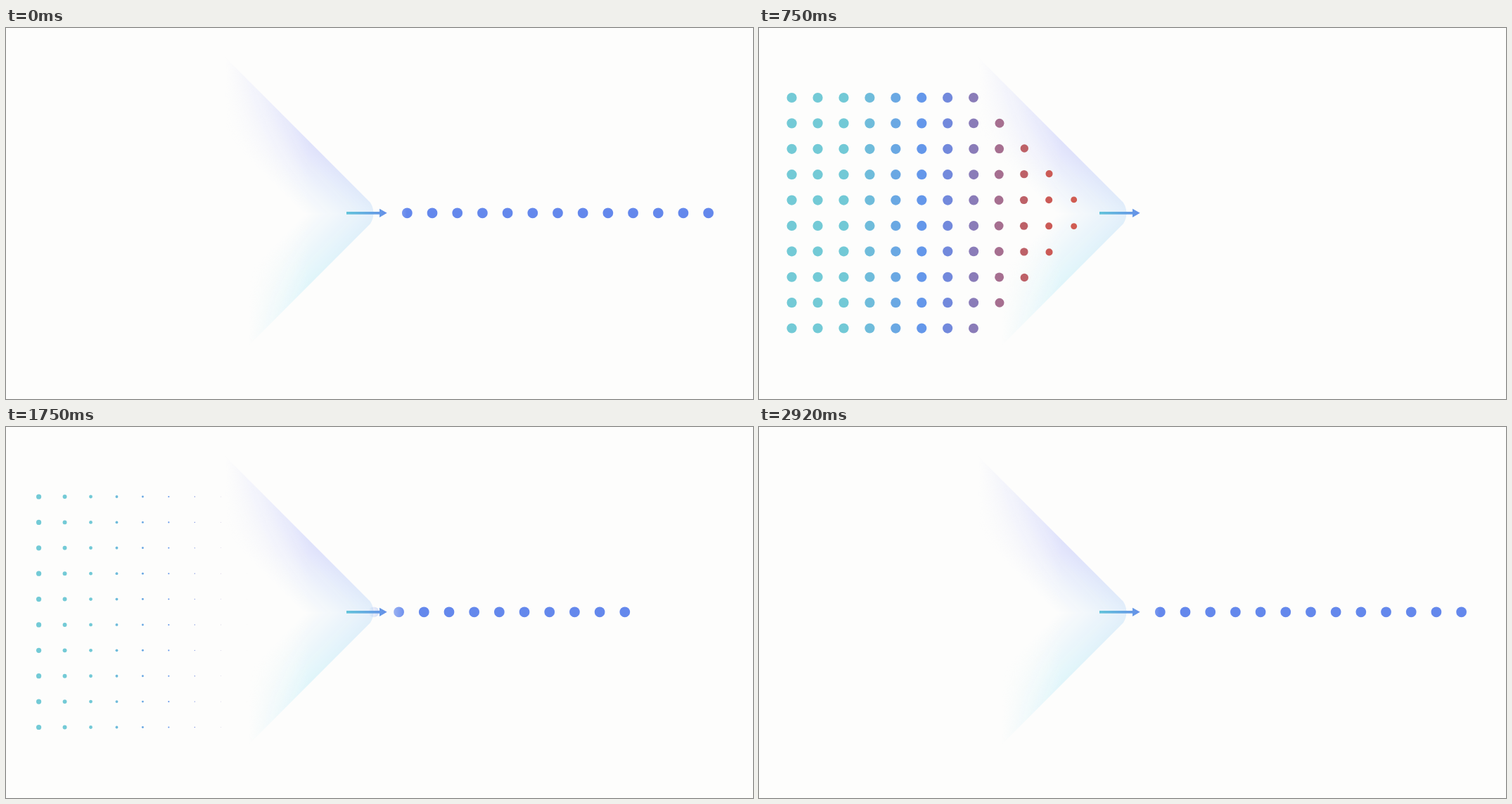
Write an HTML page that moves like this. It is 1062 px wide and 527 px high and loops after 2960 ms.

```html
<!DOCTYPE html>
<html lang="en">
<head>
<meta charset="utf-8">
<title>Dots through a funnel</title>
<style>
  html, body { margin: 0; width: 100%; height: 100%; overflow: hidden; background: #fdfdfc; }
  svg { display: block; width: 1062px; height: 527px; }
</style>
</head>
<body>
<svg viewBox="0 0 1062 527">
  <defs>
    <linearGradient id="tint" gradientUnits="userSpaceOnUse" x1="0" y1="180" x2="0" y2="350">
      <stop offset="0" stop-color="#dfe2fb"/>
      <stop offset=".5" stop-color="#e0eefa"/>
      <stop offset="1" stop-color="#e0f5fa"/>
    </linearGradient>
    <linearGradient id="deepUp" gradientUnits="userSpaceOnUse" x1="432" y1="162" x2="376" y2="218">
      <stop offset="0" stop-color="#fff"/>
      <stop offset="1" stop-color="#000"/>
    </linearGradient>
    <linearGradient id="deepDown" gradientUnits="userSpaceOnUse" x1="432" y1="364" x2="378" y2="310">
      <stop offset="0" stop-color="#fff"/>
      <stop offset="1" stop-color="#000"/>
    </linearGradient>
    <linearGradient id="sideUp" gradientUnits="userSpaceOnUse" x1="312" y1="0" x2="430" y2="0">
      <stop offset="0" stop-color="#000"/>
      <stop offset="1" stop-color="#fff"/>
    </linearGradient>
    <linearGradient id="sideDown" gradientUnits="userSpaceOnUse" x1="345" y1="0" x2="430" y2="0">
      <stop offset="0" stop-color="#000"/>
      <stop offset="1" stop-color="#fff"/>
    </linearGradient>
    <linearGradient id="exit" gradientUnits="userSpaceOnUse" x1="515" y1="0" x2="570" y2="0">
      <stop offset="0" stop-color="#000"/>
      <stop offset="1" stop-color="#fff"/>
    </linearGradient>
    <linearGradient id="shaft" gradientUnits="userSpaceOnUse" x1="484" y1="0" x2="541" y2="0">
      <stop offset="0" stop-color="#62c4da"/>
      <stop offset="1" stop-color="#6690e8"/>
    </linearGradient>
    <mask id="depth" maskUnits="userSpaceOnUse" x="0" y="0" width="1062" height="527" style="color-interpolation:sRGB;mask-type:luminance">
      <path d="M0 0H1062V263H0Z" fill="url(#deepUp)"/>
      <path d="M0 263H1062V527H0Z" fill="url(#deepDown)"/>
    </mask>
    <mask id="side" maskUnits="userSpaceOnUse" x="0" y="0" width="1062" height="527">
      <path d="M0 0H1062V263H0Z" fill="url(#sideUp)"/>
      <path d="M0 263H1062V527H0Z" fill="url(#sideDown)"/>
    </mask>
    <mask id="exitMask" maskUnits="userSpaceOnUse" x="0" y="0" width="1062" height="527">
      <path d="M0 0H1062V527H0Z" fill="url(#exit)"/>
    </mask>
    <clipPath id="field"><path d="M0 75H1062V445H0Z"/></clipPath>
  </defs>

  <g mask="url(#side)">
    <g mask="url(#depth)">
      <path d="M312 42L518 248Q527 263 518 278L345 451H312Z" fill="url(#tint)"/>
    </g>
  </g>
  <g id="grid" clip-path="url(#field)"></g>
  <g mask="url(#exitMask)"><g id="row" fill="#6488ec"></g></g>
  <path d="M484 261H531V256.8L541.7 262.8L531 268.9V264.7H484Z" fill="url(#shaft)"/>
</svg>
<script>
const LOOP = 2960, MID_Y = 262.8, COL_MS = 38.5, RADIUS = 7.1;
const COLORS = ['#73cad6', '#73cad6', '#72c9d6', '#6fbcdb', '#6aa8e3', '#6497ea',
  '#7289dc', '#8a7cb8', '#a66f90', '#bd6168', '#cb5a56', '#d05c52'];
// dot size by distance, in columns, from the passing front
const GROW = [1, .96, .86, .74, .67, .58, .44, .3, .2, .13, .085, .057, .03, 0];
const SHRINK = [1, .98, .9, .74, .57, .46, .38, .31, .24, .18, .12, .07, .03, 0];

const clamp = (v, lo, hi) => Math.min(hi, Math.max(lo, v));

function sample(table, u) {
  u = clamp(u, 0, table.length - 1);
  const i = Math.floor(u), next = table[Math.min(i + 1, table.length - 1)];
  return table[i] + (next - table[i]) * (u - i);
}

function circle(parent, attrs) {
  const el = document.createElementNS('http://www.w3.org/2000/svg', 'circle');
  set(el, attrs);
  parent.append(el);
  return el;
}

function set(el, attrs) {
  for (const key in attrs) el.setAttribute(key, attrs[key]);
}

const grid = document.getElementById('grid');
const row = document.getElementById('row');
const dots = [], beads = [];

for (let col = 0; col < 12; col++) {
  const skip = Math.max(0, col - 7);
  for (let line = skip; line < 10 - skip; line++) {
    const el = circle(grid, { fill: COLORS[col] });
    dots.push({ el, col, x: 46.6 + 36.95 * col, y: 99 + 36.39 * line });
  }
}
for (let i = 0; i < 13; i++) beads.push(circle(row, { cy: MID_Y, r: 7.4 }));

// outward push of the ripple, stronger above and below its centre
function push(x, y, t) {
  const dx = x - (220.7 + 1.52 * (t - 500)), dy = y - MID_Y;
  const r = Math.hypot(dx, dy);
  const flat = Math.max(0, 11.2 * (1 - r / 290));
  const tall = Math.max(0, 20.5 * (1 - r / 750));
  const amount = flat + (tall - flat) * Math.abs(dy / r) ** 5;
  return [x + dx / r * amount, y + dy / r * amount];
}

function drawGrid(t) {
  for (const { el, col, x, y } of dots) {
    const size = t < 1000
      ? sample(GROW, col - (t - 500) / COL_MS)
      : sample(SHRINK, col - 3 + (t - 1460) / COL_MS);
    const [cx, cy] = t < 1000 ? push(x, y, t) : [x, y];
    set(el, { cx, cy, r: t < 40 ? 0 : RADIUS * size });
  }
}

function drawRow(t) {
  const old = t < 1000;
  const lead = old ? 998.6 : 998.8 - 243 * ((3200 - t) / 1740) ** 3.9;
  row.setAttribute('opacity', old ? clamp(1 - (t - 40) / 250, 0, 1) : 1);
  beads.forEach((el, i) => el.setAttribute('cx', lead - 35.69 * i));
}

function frame() {
  const t = performance.now() % LOOP;
  drawGrid(t);
  drawRow(t);
  requestAnimationFrame(frame);
}
frame();
</script>
</body>
</html>
```
